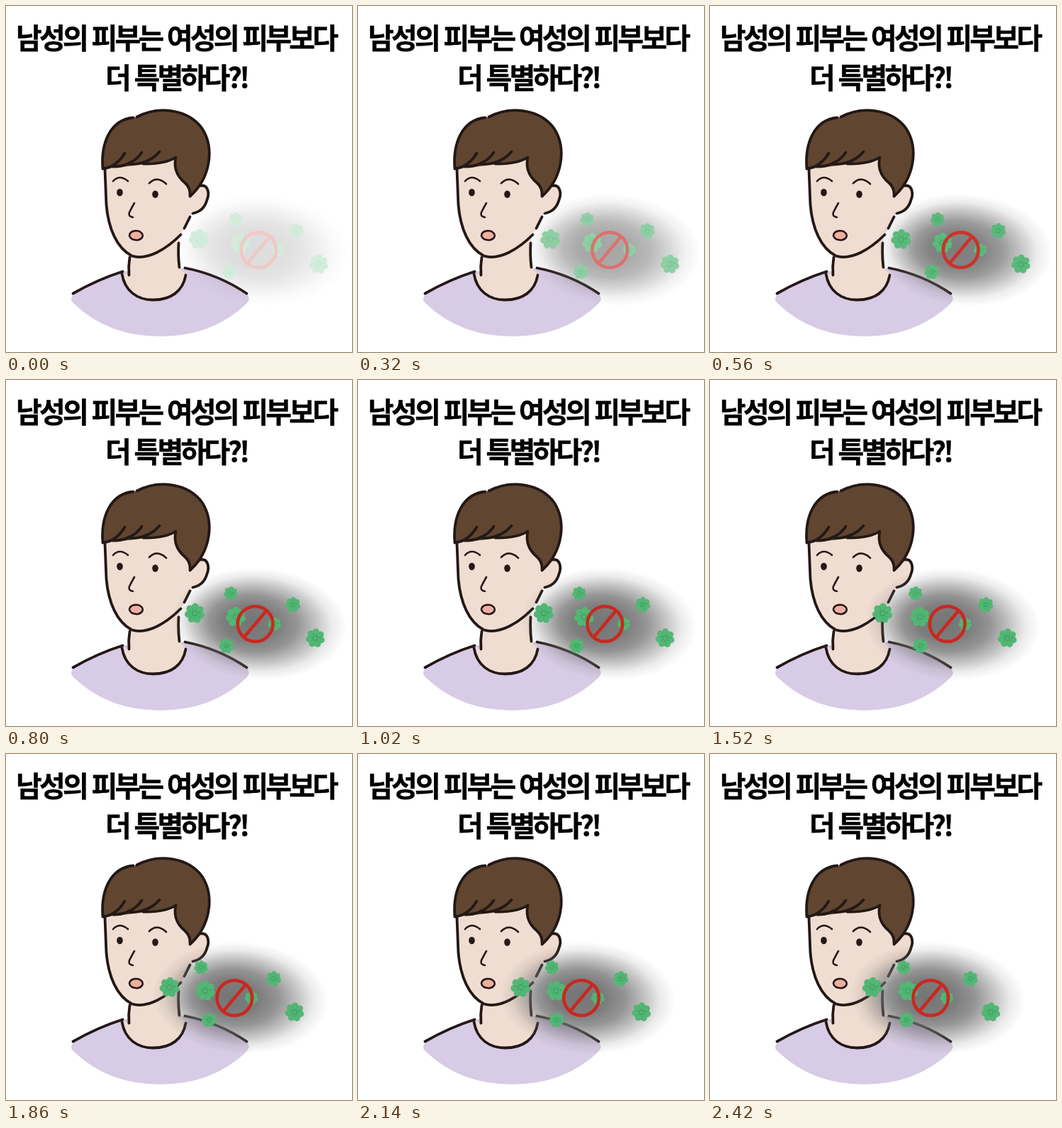
An HTML page for the animation above (2500 ms loop, 488 by 488 pixels).

```html
<!DOCTYPE html>
<html lang="ko">
<head>
<meta charset="utf-8">
<title>피부 이야기</title>
<style>
html, body { margin: 0; width: 100%; height: 100%; overflow: hidden; background: #fff; }
svg { display: block; width: 488px; height: 488px; }
.title { font: 700 40px "Noto Sans CJK KR", "Noto Sans CJK", "Noto Sans CJK JP", sans-serif; letter-spacing: -3.8px; fill: #000; stroke: #000; stroke-width: .4px; }
.line { fill: none; stroke: #231815; stroke-width: 3.8; stroke-linecap: round; stroke-linejoin: round; }
.thin { stroke-width: 2.6; }
</style>
</head>
<body>
<svg viewBox="0 0 488 488">
  <defs>
    <radialGradient id="smoke" fx=".43">
      <stop offset="0" stop-color="#717171" stop-opacity=".97"/>
      <stop offset=".3" stop-color="#717171" stop-opacity=".92"/>
      <stop offset=".5" stop-color="#717171" stop-opacity=".75"/>
      <stop offset=".7" stop-color="#717171" stop-opacity=".41"/>
      <stop offset=".85" stop-color="#717171" stop-opacity=".14"/>
      <stop offset="1" stop-color="#717171" stop-opacity="0"/>
    </radialGradient>
  </defs>
  <rect width="488" height="488" fill="#fff"/>
  <g class="title">
    <text x="14" y="60">남성의 피부는 여성의 피부보다</text>
    <text x="140" y="116">더 특별하다?!</text>
  </g>

  <g transform="translate(-.5 .5)">
    <!-- shirt, neck, face -->
    <path fill="#d8cbe5" d="M93 411Q95 405 104 400Q134 384 165 374L254 369Q300 378 334 401Q342 406 343 411Q344 415 339 420Q291 465.500 218 465.500Q145 465.500 97 420Q91 415 93 411Z"/>
    <path fill="#f0ddd1" d="M174 345V379L164 377C168 402 186 414 208 414C233 414 250 402 254 378L245 368V320Z"/>
    <path fill="#f0ddd1" d="M140 226L142 280C145 314 157 341 178 352C201 359 228 341 247 322Q255 310 263 292C274 291 282 283 284 273C289 262 284 251 274 253L262 262L240 200H150Z"/>
    <g class="line">
      <path d="M95 405Q130 385 165 374M253 369Q300 378 340 405"/>
      <path d="M164 377C168 402 186 414 208 414C233 414 250 402 254 379"/>
      <path d="M175 354Q173 366 174 379M244 334Q243 352 245 368"/>
      <path d="M140 230L142 280C145 314 157 341 178 352C201 359 228 341 247 322M252 313L260 297"/>
      <path d="M275 253C285 251 288 263 284 273C281 284 274 290 264 292"/>
    </g>

    <!-- hair -->
    <path fill="#604630" d="M137 229C134 192 148 158 182 157C215 138 258 146 277 172C295 200 289 242 260 268Q261 256 253 249Q243 241 240 230Q238 221 240 213Q230 221 193 223Q165 227 137 229Z"/>
    <path class="line" d="M180 157C148 160 134 192 137 229Q156 227 168 207M152 226Q164 226 172 222Q185 217 192 206M172 222Q182 224 194 220Q208 216 217 205M194 222Q224 223 240 213Q238 221 240 230Q243 241 253 249Q261 256 260 268C289 242 295 200 277 172C258 146 217 139 185 156"/>
  </g>

  <!-- features -->
  <g class="line thin">
    <path d="M151 247Q160 237 172 247M202 250Q213 239 226 251"/>
    <path d="M181 278Q177 285 174 291Q172 297 179 298"/>
    <path fill="#f2ada2" d="M174 323C176 316 187 315 192 321C195 327 188 331 183 330C178 330 174 327 174 323Z"/>
  </g>
  <ellipse cx="160.5" cy="263" rx="4.3" ry="5.2" fill="#231815"/>
  <ellipse cx="210.5" cy="265.5" rx="4.3" ry="5.2" fill="#231815"/>

  <g id="dust"></g>
</svg>
<script>
const NS = "http://www.w3.org/2000/svg";
const dust = document.getElementById("dust");
const LOOP = 2500, STEP = 20, LAST = 2420;

function add(parent, tag, attrs) {
  const el = document.createElementNS(NS, tag);
  for (const k in attrs) el.setAttribute(k, attrs[k]);
  return parent.appendChild(el);
}

// monotone cubic through a few eased positions
const times = [0, 320, 800, 1240, 1520, 1860, 2420];
function curve(ys) {
  const n = ys.length - 1;
  const d = ys.slice(1).map((y, i) => (y - ys[i]) / (times[i + 1] - times[i]));
  const m = ys.map((_, i) => i === 0 || i === n ? 0 : 2 * d[i - 1] * d[i] / (d[i - 1] + d[i] || 1));
  return t => {
    let i = 0;
    while (i < n - 1 && t > times[i + 1]) i++;
    const h = times[i + 1] - times[i], u = (t - times[i]) / h, v = 1 - u;
    return ys[i] * (1 + 2 * u) * v * v + m[i] * h * u * v * v
         + ys[i + 1] * u * u * (3 - 2 * u) - m[i + 1] * h * u * u * v;
  };
}
const slow = curve([0, .025, .105, .285, .48, .755, 1]);
const quick = curve([0, .015, .135, .375, .67, .96, 1]);

const movers = [];
function mover(x, y, dx, ease) {
  const el = add(dust, "g", {});
  movers.push({ el, x, y, dx, ease });
  return el;
}

function germ(x, y, r, dx, ease) {
  const g = mover(x, y, dx, ease);
  const dot = (a, dist, size, fill) => add(g, "circle", {
    cx: Math.cos(a) * dist * r, cy: Math.sin(a) * dist * r, r: size * r, fill
  });
  dot(0, 0, .78, "#52b674");
  for (let i = 0; i < 7; i++) {
    const a = i * Math.PI * 2 / 7 + .3;
    dot(a, .65, .33, "#52b674");
    dot(a + .45, .48, .075, "#36935b");
  }
  add(g, "circle", { r: .24 * r, fill: "none", stroke: "#3fa066", "stroke-width": .1 * r });
}

add(mover(361, 344, 40, slow), "ellipse", { rx: 124, ry: 79, fill: "url(#smoke)", transform: "rotate(4)" });
germ(272, 329, 14.5, 43, quick);
germ(324, 301, 10, 51, quick);
germ(331, 334, 14.5, 52, quick);
germ(384, 344, 9.5, 50, slow);
germ(409, 317, 11, 42, slow);
germ(441, 364, 13.8, 45, slow);
germ(315, 375, 10.8, 38, slow);

const ban = mover(356.3, 344, 45, slow);
const red = { fill: "none", stroke: "#c9281e", "stroke-width": 4.6 };
add(ban, "circle", { r: 24.8, ...red });
add(ban, "path", { d: "M-16 19L16-19", ...red });

function draw(now) {
  const t = Math.min(LAST, Math.floor(now % LOOP / STEP) * STEP);
  dust.setAttribute("opacity", Math.min(1, .25 + t / 800));
  for (const { el, x, y, dx, ease } of movers)
    el.setAttribute("transform", `translate(${(x - dx * ease(t)).toFixed(2)} ${y})`);
}

const start = performance.now();
function tick() {
  draw(performance.now() - start);
  requestAnimationFrame(tick);
}
tick();
</script>
</body>
</html>
```
